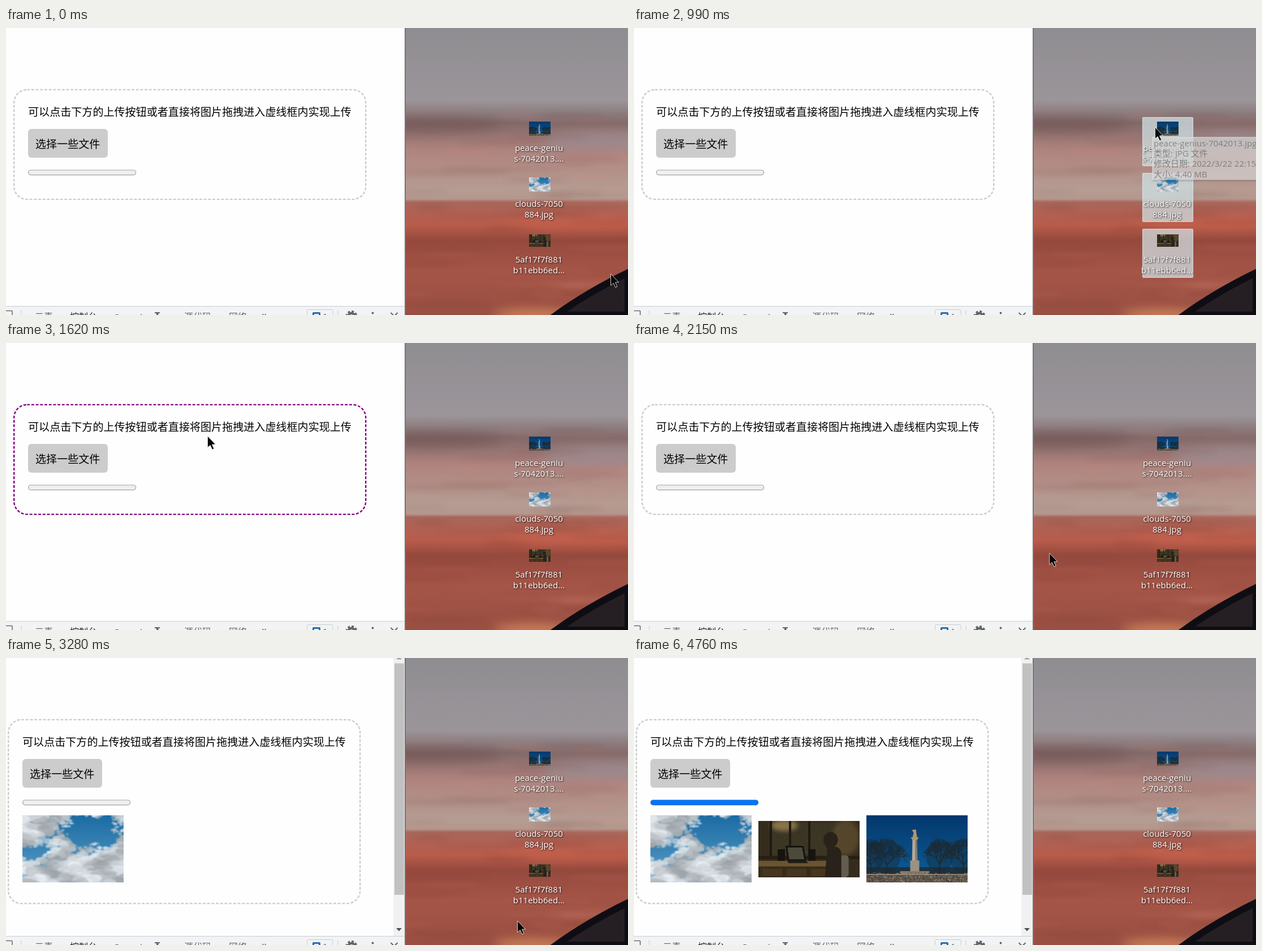
These frames come from a looping animation (1100 px wide and 509 px high, 4.82 s). An HTML page with a canvas:

```html
<!DOCTYPE html>
<html lang="zh">
<head>
<meta charset="utf-8">
<style>
  html, body { margin: 0; width: 100%; height: 100%; overflow: hidden; background: #fefefe; }
  canvas { display: block; }
</style>
</head>
<body>
<canvas id="stage" width="1100" height="509"></canvas>
<script>
const LOOP = 4820, TICK = 67.6, W = 1100, H = 509;
const CJK = '"Noto Sans CJK SC", "Noto Sans CJK", sans-serif';
const UI = '"Open Sans", "Noto Sans CJK SC", "Noto Sans CJK", sans-serif';
const c = document.getElementById('stage').getContext('2d');

// ---------- helpers ----------
let seed = 7;
const rnd = (a = 0, b = 1) => {
  seed = (seed * 16807) % 2147483647;
  return a + (b - a) * seed / 2147483647;
};
const repeat = (count, fn) => { for (let i = 0; i < count; i++) fn(i); };

function rect(g, x, y, w, h, color) {
  g.fillStyle = color;
  g.fillRect(x, y, w, h);
}

function ellipse(g, x, y, rx, ry, color) {
  g.fillStyle = color;
  g.beginPath();
  g.ellipse(x, y, rx, ry, 0, 0, 7);
  g.fill();
}

function shape(g, path, fill, stroke, width = 1) {
  const p = new Path2D(path);
  if (fill) { g.fillStyle = fill; g.fill(p); }
  if (stroke) { g.strokeStyle = stroke; g.lineWidth = width; g.stroke(p); }
}

function round(g, x, y, w, h, r, fill, stroke, width = 1) {
  g.beginPath();
  g.roundRect(x, y, w, h, r);
  if (fill) { g.fillStyle = fill; g.fill(); }
  if (stroke) { g.strokeStyle = stroke; g.lineWidth = width; g.stroke(); }
}

function text(str, x, y, font, color, align = 'left') {
  c.font = font;
  c.fillStyle = color;
  c.textAlign = align;
  c.fillText(str, x, y);
}

function gradient(g, h, stops) {
  const fill = g.createLinearGradient(0, 0, 0, h);
  for (const [y, color] of stops) fill.addColorStop(y / h, color);
  return fill;
}

function shadow(color, blur = 3) {
  c.shadowColor = color;
  c.shadowBlur = blur;
  c.shadowOffsetX = c.shadowOffsetY = 1;
}

function layer(w, h, scale, paint) {
  const canvas = document.createElement('canvas');
  canvas.width = w * scale;
  canvas.height = h * scale;
  const g = canvas.getContext('2d');
  g.scale(scale, scale);
  paint(g, w, h);
  return canvas;
}

// ---------- pictures ----------
const wallpaper = layer(393, H, 1, (g, w, h) => {
  rect(g, 0, 0, w, h, gradient(g, h, [
    [0, '#8f8d91'], [128, '#9b959a'], [168, '#826969'], [215, '#af837d'], [285, '#b59c93'],
    [303, '#b4978d'], [309, '#a8665a'], [350, '#b85c4b'], [376, '#95493d'], [430, '#a55547'],
    [h, '#984f42']]));
  g.filter = 'blur(9px)';
  ellipse(g, 40, 172, 130, 14, 'rgba(110,80,80,.5)');
  ellipse(g, 350, 200, 110, 18, 'rgba(156,142,147,.7)');
  ellipse(g, 300, 345, 130, 14, 'rgba(202,98,76,.5)');
  ellipse(g, 225, 508, 70, 9, 'rgba(225,150,100,.8)');
  g.filter = 'blur(4px)';
  repeat(50, i => ellipse(g, rnd(0, w), rnd(145, 500), rnd(30, 110), rnd(2, 6),
    i % 2 ? 'rgba(90,40,40,.09)' : 'rgba(225,150,130,.1)'));
  g.filter = 'none';
  shape(g, 'M266 509 Q323 468 393 434 V509 Z', '#251f24', '#0f0d14', 12);
});

const clouds = layer(179, 119, 2, (g, w, h) => {
  rect(g, 0, 0, w, h, gradient(g, h, [[0, '#1b6ba4'], [h, '#5b9fc8']]));
  // puffs fill everything but two gaps of open sky
  const gap = (x, y, cx, cy, rx, ry) => Math.hypot((x - cx) / rx, (y - cy) / ry);
  g.filter = 'blur(2px)';
  repeat(700, i => {
    const x = rnd(-5, w + 5), y = i / 700 * (h + 10) - 5;
    const ripple = Math.sin(x / 9) * Math.cos(y / 8) * .25;
    const open = Math.min(gap(x, y, 125, 28, 42, 27), gap(x, y, 20, 66, 25, 11)) + ripple;
    if (open < 1) return;
    const size = 2.5 + 8 * Math.min(1, open - 1);
    const tone = Math.round(202 + 28 * Math.sin(x / 15 + 2 * Math.sin(y / 12)) + rnd(-18, 18));
    ellipse(g, x, y, size * rnd(.8, 1.3), size * rnd(.5, .8),
      `rgba(${tone - 6},${tone},${tone + 5},.7)`);
  });
});

const room = layer(179, 100, 2, (g, w, h) => {
  rect(g, 0, 0, w, h, '#352c1c');
  rect(g, 24, 3, 120, 60, '#3b3524');
  g.filter = 'blur(8px)';
  ellipse(g, 46, 8, 24, 10, 'rgba(170,145,90,.7)');
  ellipse(g, 155, 30, 24, 32, 'rgba(100,82,50,.7)');
  g.filter = 'none';
  repeat(60, () => rect(g, rnd(26, 142), rnd(8, 60), 1.5, 1, 'rgba(140,120,78,.35)'));
  repeat(3, i => rect(g, 20 + i * 34, 0, 4, 68, '#1f1a12'));
  rect(g, 0, 62, w, 6, '#281f13');
  rect(g, 0, 71, 150, 10, '#6b5431');
  rect(g, 0, 81, 130, 19, '#382b1a');
  repeat(3, i => rect(g, 7 + i * 43, 85, 35, 13, '#46361f'));
  for (const x of [34, 88]) rect(g, x, 50, 13, 21, '#17140f');
  shape(g, 'M50 46 H79 L83 70 H53 Z', '#4c4a3c', '#14130e', 3);
  shape(g, 'M51 70 H84 L88 75 H53 Z', '#1f1d17');
  round(g, 143, 61, 17, 39, 6, '#625c4f');
  // plain seated figure
  shape(g, 'M115 34 A13 14 0 1 1 134 46 Q147 46 147 60 V100 H118 L122 48 Q116 42 115 34 Z', '#29221a');
});

const column = layer(179, 119, 2, (g, w, h) => {
  rect(g, 0, 0, w, h, gradient(g, h, [[0, '#04386d'], [h, '#0f5f98']]));
  const branch = (x, y, angle, length, depth) => {
    const x2 = x + Math.cos(angle) * length, y2 = y + Math.sin(angle) * length;
    g.lineWidth = .45 + depth * .3;
    g.beginPath();
    g.moveTo(x, y);
    g.lineTo(x2, y2);
    g.stroke();
    if (depth) for (const turn of [-.6, 0, .6])
      branch(x2, y2, angle + turn + rnd(-.25, .25), length * rnd(.7, .86), depth - 1);
  };
  g.strokeStyle = '#1d2a33';
  for (const x of [8, 37, 130, 172]) {
    ellipse(g, x, 72, 24, 30, 'rgba(22,42,58,.45)');
    branch(x, 106, -1.57, 18, 5);
  }
  rect(g, 0, 92, w, 14, 'rgba(34,38,40,.75)');
  shape(g, 'M82 39 H90 L91 95 H81 Z', '#b3a999');
  rect(g, 87, 39, 3, 56, '#7d766e');
  shape(g, 'M79 39 H93 L90 44 H82 Z M82 39 L84 31 81 26 88 25 90 39 Z', '#b0966c');
  rect(g, 78, 80, 16, 20, '#9c9181');
  rect(g, 60, 99, 52, 7, '#857a6b');
  rect(g, 0, 104, w, 15, '#5f564b');
  repeat(320, () => rect(g, rnd(0, w), rnd(101, h), rnd(1, 3), rnd(1, 2.5),
    rnd() < .5 ? 'rgba(165,150,128,.6)' : 'rgba(45,42,40,.6)'));
  rect(g, 0, 104, w, 1.5, '#a19280');
});

// ---------- motion ----------
// pointer moves: begin, end, x, y, sag of the path
const REST = [1069, 436];
const MOVES = [
  [70, 200, 1031, 440, 0],
  [200, 684, 921, 176, 0],
  [1130, 1550, 356, 165, 30],
  [1680, 2340, 904, 466, 0],
  [4010, 4300, 999, 451, 24]
];
const MARQUEE = [200, 680], SELECTED = [610, 1610], TOOLTIP = [980, 1125],
  PRESS = [1125, 1610], DRAG = [1200, 1610], HOVER = [1337, 1680],
  UPLOAD = 2347, COMPLETE = 3420, POINTER_GONE = 4360;
const within = (t, [a, b]) => t >= a && t < b;

function pointerAt(t) {
  let [x, y] = REST;
  for (const [begin, end, toX, toY, sag] of MOVES) {
    const p = Math.max(0, Math.min(1, (t - begin) / (end - begin)));
    const eased = p * p * (3 - 2 * p);
    x += (toX - x) * eased;
    y += (toY - y) * eased + sag * Math.sin(Math.PI * p);
  }
  return [x, y];
}

// ---------- scene parts ----------
const FILES = [
  { image: column, h: 25, label: ['peace-geniu', 's-7042013....'] },
  { image: clouds, h: 25, label: ['clouds-7050', '884.jpg'] },
  { image: room, h: 22, label: ['5af17f7f881', 'b11ebb6ed...'] }
].map((file, i) => ({ ...file, top: 158 + 99 * i }));

function drawFile(file, selected) {
  if (selected) round(c, 899.5, file.top + .5, 89, 86, 1,
    'rgba(210,228,232,.72)', 'rgba(225,238,242,.8)');
  c.drawImage(file.image, 925, file.top + 20.5 - file.h / 2, 38, file.h);
  shadow('rgba(0,0,0,.85)');
  file.label.forEach((line, i) =>
    text(line, 942.5, file.top + 59.5 + i * 19, `15px ${UI}`, '#fff', 'center'));
  c.shadowColor = 'transparent';
}

function drawPage(uploading, complete, hovered) {
  const x = uploading ? -10 : 0, font = `19.07px ${CJK}`;
  c.setLineDash([4.9, 2.8]);
  round(c, x + 14.2, 109.4, 622, uploading ? 326 : 194.5, 23, null, hovered ? '#800080' : '#ccc', 2.4);
  c.setLineDash([]);
  text('可以点击下方的上传按钮或者直接将图片拖拽进入虚线框内实现上传', x + 39, 155.5, font, '#000');
  round(c, x + 39, 179, 141, 51, 6, '#ccc');
  text('选择一些文件', x + 52, 213, font, '#000');
  round(c, x + 39.6, 252, 190, 8.6, 4.3, complete ? '#0075ff' : '#efefef',
    complete ? '#2a6fc0' : '#a3a3a3', 1.2);
  if (uploading) c.drawImage(clouds, 29, 279, 179, 119);
  if (complete) {
    c.drawImage(room, 220, 289, 178.5, 99.5);
    c.drawImage(column, 410.5, 279, 179, 119);
  }
}

function drawScrollbar() {
  rect(c, 685, 0, 20, 493, '#f1f1f1');
  rect(c, 687, 9.5, 17, 410.5, '#c1c1c1');
  shape(c, 'M690 2.5 H700 L695 -2.5 Z', '#a3a3a3');
  shape(c, 'M690 479 H700 L695 484.5 Z', '#505050');
}

function drawToolbar() {
  const gray = '#5f6368', line = '#cacdd1';
  rect(c, 0, 493, 705, 16, '#f1f3f4');
  rect(c, 0, 493, 705, 1, line);
  round(c, -6, 501.5, 17, 14, 1, null, '#6e6e6e', 1.6);
  for (const x of [26.5, 586.5]) rect(c, x, 501, 1, 8, line);
  const tabs = { 元素: 51, 控制台: 113, 源代码: 315, 网络: 394 };
  for (const name in tabs)
    text(name, tabs[name], 517.5, `16px ${CJK}`, name === '控制台' ? '#202124' : gray);
  text('Recorder', 192, 517.5, `15px ${UI}`, gray);
  shape(c, 'M263 504 H272 V506 H269.5 V509 H266 V506 H263 Z', gray);
  text('»', 452, 517, `22px ${UI}`, gray);
  round(c, 532.5, 499.5, 45.5, 16, 2, null, line);
  round(c, 542, 504, 14, 12, 2, '#2b6cab');
  rect(c, 545, 507, 8, 2, '#e5edf5');
  text('1', 560, 517, `15px ${UI}`, gray);
  c.setLineDash([4, 3.07]);
  c.strokeStyle = gray;
  c.lineWidth = 3;
  c.beginPath();
  c.arc(611, 511.5, 9, 0, 2 * Math.PI);
  c.stroke();
  c.setLineDash([]);
  ellipse(c, 611, 511.5, 7.8, 7.8, gray);
  ellipse(c, 611, 511.5, 3.5, 3.5, '#f1f3f4');
  ellipse(c, 648.5, 505.5, 1.9, 1.9, gray);
  shape(c, 'M680.5 505 L686.5 511 692.5 505', null, gray, 2);
}

function drawTooltip(alpha) {
  c.globalAlpha = alpha;
  shadow('rgba(0,0,0,.4)');
  rect(c, 916, 193, 190, 76.5, '#f2f2f2');
  c.shadowColor = 'transparent';
  ['peace-genius-7042013.jpg', '类型: JPG 文件', '修改日期: 2022/3/22 22:15', '大小: 4.40 MB']
    .forEach((line, i) => text(line, 919, 209.5 + i * 18.4, `15px ${UI}`, '#575757'));
  c.globalAlpha = 1;
}

function drawPointer(x, y, pressed) {
  if (pressed) ellipse(c, x, y + 1, 15, 15, 'rgba(232,234,55,.82)');
  c.save();
  c.translate(x + .5, y);
  shape(c, 'M0 0 V20.5 L4.7 16.4 8.2 24 11.4 22.6 8 15.2 14 14.8 Z', '#080808', 'rgba(255,255,255,.75)');
  c.restore();
}

// ---------- frame ----------
function draw(now) {
  const t = now % LOOP;
  // the pointer is sampled in even ticks, as in a screen recording
  const [x, y] = pointerAt(Math.floor((t + 5) / TICK) * TICK);
  const marquee = within(t, MARQUEE), uploading = t >= UPLOAD;
  const left = Math.min(1031, x + 3), top = Math.min(440, y + 6);
  const isSelected = file => within(t, SELECTED) ||
    marquee && left < 989 && top < file.top + 80;

  rect(c, 0, 0, W, H, '#fefefe');
  c.drawImage(wallpaper, 707, 0);
  drawPage(uploading, t >= COMPLETE, within(t, HOVER));
  if (uploading) drawScrollbar();
  drawToolbar();
  rect(c, 705, 0, 2, H, '#77757a');

  FILES.forEach(file => drawFile(file, isSelected(file)));
  if (marquee) round(c, left, top, 1031 - left, 440 - top, 0,
    'rgba(176,170,226,.45)', 'rgba(190,180,225,.5)');
  if (within(t, TOOLTIP)) drawTooltip(t < 1050 ? .62 : .9);
  if (within(t, DRAG)) {
    c.save();
    c.globalAlpha = .6;
    c.translate(x - 921, y - 176);
    FILES.forEach(file => drawFile(file, false));
    c.restore();
  }
  if (t < POINTER_GONE) drawPointer(x, y, marquee || within(t, PRESS));
}

let begin;
function tick(now) {
  begin ??= now;
  draw(now - begin);
  requestAnimationFrame(tick);
}
requestAnimationFrame(tick);
</script>
</body>
</html>
```
